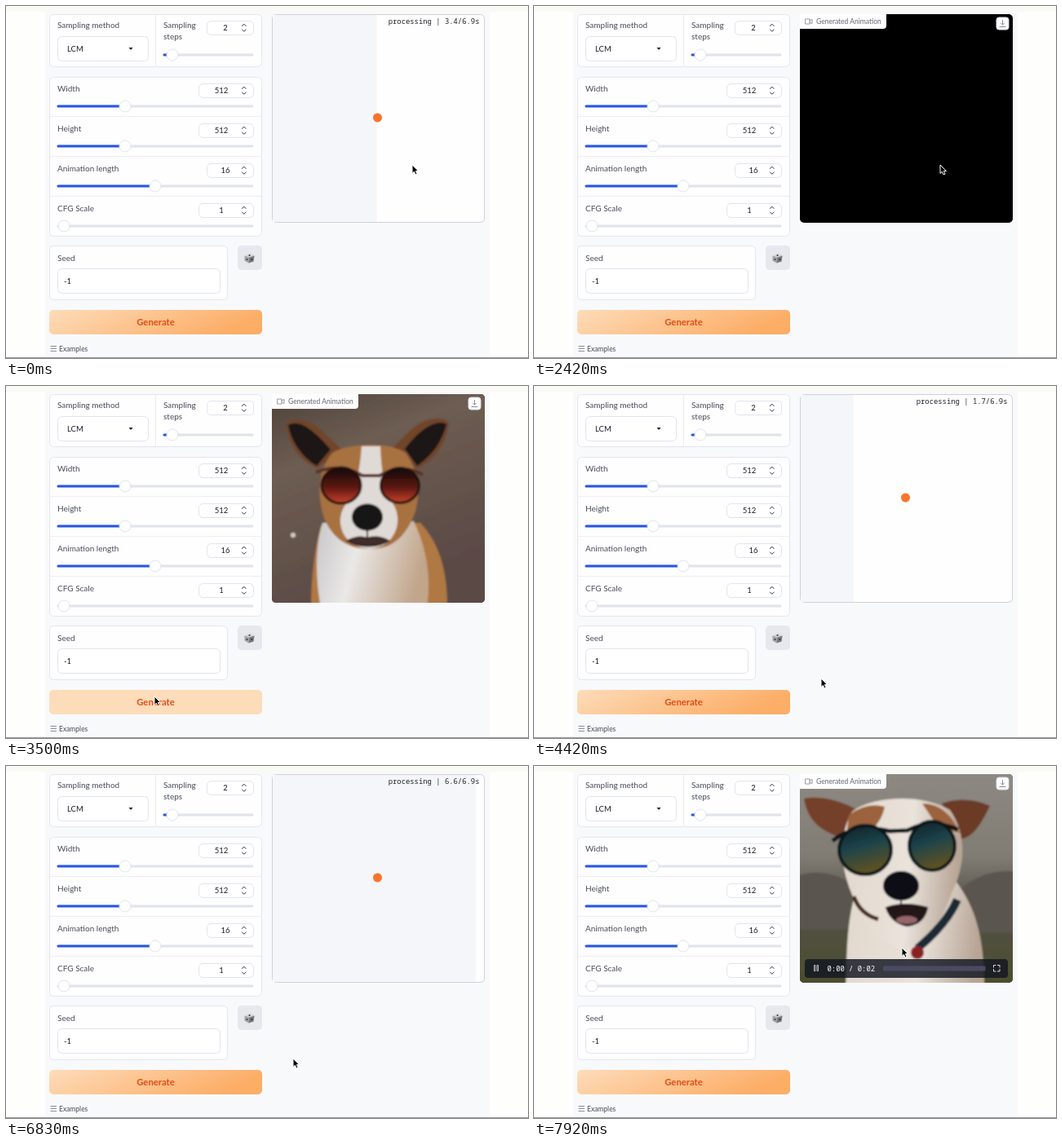
These frames come from a looping animation (640x432 px, 8 s). An HTML page:

```html
<!DOCTYPE html>
<html lang="en">
<head>
<meta charset="utf-8">
<title>Animation generator</title>
<style>
  html, body { margin: 0; height: 100%; overflow: hidden; background: #fefefd; }
  svg { display: block; width: 100%; height: 100%; }
  text { font: 10px Lato, sans-serif; fill: #494c5b; }
  .value { font-size: 9.5px; fill: #1b1d26; }
  .small { font-size: 8.5px; }
  .mono { font: 8.9px "Noto Sans Mono", monospace; fill: #20222b; }
  .panel { fill: #fefefe; stroke: #e5e6ef; }
  .field { fill: #fff; stroke: #e2e3ee; }
  .rule { stroke: #ececf3; }
  .icon { fill: none; stroke: #30323c; stroke-linecap: round; stroke-linejoin: round; }
</style>
</head>
<body>
<svg viewBox="0 0 640 432">
  <defs>
    <linearGradient id="button" x2="1" y2=".25"><stop stop-color="#fddcba"/><stop offset="1" stop-color="#fcad66"/></linearGradient>
    <linearGradient id="redLens" x2="0" y2="1"><stop offset=".1" stop-color="#1d0d0f"/><stop offset=".55" stop-color="#5c1712"/><stop offset="1" stop-color="#c8422a"/></linearGradient>
    <linearGradient id="tealLens" x2=".3" y2="1"><stop offset=".05" stop-color="#0e2229"/><stop offset=".5" stop-color="#1d434a"/><stop offset="1" stop-color="#5c5224"/></linearGradient>
    <linearGradient id="road" x2=".4" y2="1"><stop stop-color="#4d4138"/><stop offset=".35" stop-color="#6d5d52"/><stop offset="1" stop-color="#5a4945"/></linearGradient>
    <linearGradient id="meadow" x2="0" y2="1"><stop stop-color="#8e8983"/><stop offset=".4" stop-color="#817c73"/><stop offset=".62" stop-color="#54524a"/><stop offset="1" stop-color="#4b4e2c"/></linearGradient>
    <linearGradient id="chest" x2="1" y2=".2"><stop stop-color="#c9c6c8"/><stop offset=".4" stop-color="#eae8e7"/><stop offset="1" stop-color="#c2a68c"/></linearGradient>
    <linearGradient id="fur" x2="1" y2=".1"><stop offset=".1" stop-color="#e3d9cf"/><stop offset=".6" stop-color="#e9e3db"/><stop offset="1" stop-color="#b8a596"/></linearGradient>
    <clipPath id="frame"><rect x="326" y="10" width="261" height="256" rx="5"/></clipPath>
    <filter id="soft"><feGaussianBlur stdDeviation=".8"/></filter>
  </defs>

  <rect width="640" height="432" fill="#fefefd"/>
  <rect x="48" width="545" height="432" fill="#f8f9fb"/>
  <rect width="640" height="7" fill="#fafaf4"/>
  <path d="M0 431.5H640" stroke="#96969c"/>
  <g id="form"></g>

  <g id="status">
    <rect class="panel" x="326.5" y="10.5" width="260" height="255" rx="5" style="stroke:#cfd0da"/>
    <rect id="fill" x="327" y="11" height="254" fill="#f5f6f9"/>
    <circle cx="455.5" cy="137" r="5.5" fill="#f9742a"/>
    <text id="timer" class="mono" x="580.5" y="22" text-anchor="end"></text>
  </g>

  <g id="player">
    <g clip-path="url(#frame)">
      <rect x="326" y="10" width="261" height="256"/>
      <g id="dogA" filter="url(#soft)">
        <rect x="320" y="4" width="273" height="268" fill="url(#road)"/>
        <circle cx="352" cy="183" r="3" fill="#d3cbc0"/>
        <path d="M386 172C378 200 374 240 374 272H541C541 232 534 196 508 168Z" fill="#b07842"/>
        <path d="M388 168C378 200 380 240 386 272H516C522 230 514 196 500 166Z" fill="url(#chest)"/>
        <path d="M343 46C352 38 372 40 386 54L412 78L382 101C360 92 346 72 343 46Z" fill="#70452a"/>
        <path d="M543 45C534 35 510 40 494 56L474 76L504 101C526 92 540 70 543 45Z" fill="#70452a"/>
        <path d="M346 48C358 41 374 50 398 78L381 98C364 88 350 70 346 48Z" fill="#1e1517"/>
        <path d="M540 47C528 40 508 52 489 77L504 98C522 86 535 68 540 47Z" fill="#1e1517"/>
        <path d="M400 82C420 70 470 68 490 82C508 106 510 142 496 168C482 194 466 200 445 200C418 200 400 186 390 162C380 130 384 102 400 82Z" fill="#a8713f"/>
        <path d="M436 74H459C460 100 462 122 474 144C488 164 478 198 446 200C412 198 402 166 416 146C430 126 434 102 436 74Z" fill="#dfdad6"/>
        <path d="M380 106Q410 94 437 110H458Q486 94 511 109" fill="none" stroke="#5b3020" stroke-width="4"/>
        <g fill="url(#redLens)" stroke="#22110f" stroke-width="3">
          <ellipse cx="411" cy="122" rx="24" ry="22"/><ellipse cx="483" cy="122" rx="23.5" ry="21.5"/>
        </g>
        <ellipse cx="443" cy="161" rx="19" ry="16.5" fill="#141214"/>
        <path d="M443 177V187M419 190Q432 183 443 187Q457 183 469 190Q458 197 444 196Q430 197 419 190Z" fill="#3f2d2b" stroke="#2d2120" stroke-width="2"/>
      </g>
      <g id="dogB" filter="url(#soft)">
        <rect x="320" y="4" width="273" height="268" fill="url(#meadow)"/>
        <path d="M320 136Q356 122 392 146V200H320ZM593 130Q552 124 516 156V204H593Z" fill="#5a5650"/>
        <path d="M396 150C382 190 384 240 382 272H552C552 222 546 178 516 140Z" fill="url(#fur)"/>
        <path d="M331 40C350 36 376 42 396 54L376 88C354 80 336 70 331 40Z" fill="#74402a"/>
        <path d="M559 49C544 42 522 38 500 46L522 90C538 88 548 72 559 49Z" fill="#6c3b28"/>
        <path d="M390 56C416 36 478 34 510 54C530 82 530 120 512 156C498 196 480 222 452 224C422 222 402 190 390 158C374 120 374 84 390 56Z" fill="url(#fur)"/>
        <path d="M386 60Q408 44 430 50Q424 82 382 96ZM476 46Q506 46 522 82L496 76Z" fill="#9b623e"/>
        <path d="M392 160Q400 182 422 188" fill="none" stroke="#47291f" stroke-width="5"/>
        <path d="M519 164Q506 194 470 224" fill="none" stroke="#1c2b35" stroke-width="10"/>
        <circle cx="470" cy="229" r="8" fill="#8b2222"/>
        <path d="M366 92Q392 70 436 80L458 79Q486 64 520 78" fill="none" stroke="#0b1219" stroke-width="5"/>
        <g fill="url(#tealLens)" stroke="#0b1219" stroke-width="4">
          <ellipse cx="406" cy="103" rx="32" ry="30"/><ellipse cx="488" cy="98" rx="28" ry="30"/>
        </g>
        <ellipse cx="450" cy="147" rx="22" ry="18" fill="#101114"/>
        <path d="M450 163V172M432 174Q454 166 482 174Q478 194 457 196Q438 192 432 174Z" fill="#211619" stroke="#1f181a" stroke-width="2"/>
        <ellipse cx="457" cy="189" rx="13" ry="5" fill="#95656c"/>
      </g>
    </g>
    <path d="M326 10H432V24Q432 28 428 28H326Z" fill="#fefefe"/>
    <path class="icon" d="M333 16H338V22H333ZM338 18L341 16.5V21.5L338 20" style="stroke:#9698a3"/>
    <text class="small" x="346" y="22" style="fill:#646774">Generated Animation</text>
    <rect x="567" y="14" width="15" height="15" rx="3" fill="#fefefe" stroke="#dcdde6"/>
    <path class="icon" d="M574.5 17.5V23M572.5 21L574.5 23L576.5 21M571 25.5H578" style="stroke:#8a8c98"/>
    <g id="controls">
      <rect x="332" y="237" width="249" height="23" rx="4" fill="#121722" fill-opacity=".82"/>
      <path d="M343.5 244.5H345V251.5H343.5ZM347 244.5H348.5V251.5H347Z" fill="none" stroke="#ddd" stroke-width=".8"/>
      <text id="clock" class="mono" x="359.5" y="251.5" style="fill:#fff"></text>
      <rect x="428" y="245.5" width="125.5" height="6" rx="1" fill="#4a4b62"/>
      <rect id="played" x="428" y="245.5" height="6" rx="1" fill="#f7f6f4"/>
      <path class="icon" d="M563.5 247V244.5H566M568.5 244.5H571V247M571 249.5V252H568.5M566 252H563.5V249.5" style="stroke:#ddd"/>
    </g>
  </g>

  <g id="cursor">
    <path id="arrow" d="M0 0V10.5L2.4 8.3L4.1 12L6 11.2L4.4 7.6H7.5Z" fill="#000" stroke="#fff"/>
    <g id="beam" fill="none">
      <path d="M-3-6Q0-6 0-4Q0-6 3-6M0-4V4M-3 6Q0 6 0 4Q0 6 3 6" stroke="#fff" stroke-width="2.6"/>
      <path d="M-3-6Q0-6 0-4Q0-6 3-6M0-4V4M-3 6Q0 6 0 4Q0 6 3 6" stroke="#333"/>
    </g>
  </g>
</svg>
<script>
const $ = id => document.getElementById(id);
const box = (cls, x, y, w, h, r = 5) =>
  `<rect class="${cls}" x="${x + .5}" y="${y + .5}" width="${w - 1}" height="${h - 1}" rx="${r}"/>`;
const label = (text, x, y, attrs = '') => `<text x="${x}" y="${y}" ${attrs}>${text}</text>`;

const numberBox = (value, x, y) => box('field', x, y, 304 - x, 18) +
  label(value, x + (304 - x) / 2 - 6, y + 12, 'class="value" text-anchor="middle"') +
  `<path class="icon" d="M289.5 ${y + 6.5}l2.3-2.3l2.3 2.3M289.5 ${y + 11}l2.3 2.3l2.3-2.3"/>`;

const slider = (x, y, knob) => `<g stroke-width="3" stroke-linecap="round">
  <path d="M${x + 1} ${y}H302" stroke="#e1e3eb"/>
  ${knob - x > 10 ? `<path d="M${x + 1} ${y}H${knob - 6}" stroke="#2457e6"/>` : ''}</g>
  <circle class="field" cx="${knob}" cy="${y}" r="7"/>`;

const rows = [['Width', 512, 236, 146], ['Height', 512, 236, 146],
  ['Animation length', 16, 246, 183], ['CFG Scale', 1, 236, 71]];

$('form').innerHTML =
  box('panel', 53, 10, 261, 65) + '<path class="rule" d="M183.5 11V74"/>' +
  label('Sampling method', 63, 27) + box('field', 63, 37, 112, 31) +
  label('LCM', 75, 55.5, 'class="value"') + '<path d="M150.5 51H155.5L153 54Z" fill="#20222b"/>' +
  label('Sampling', 193, 27) + label('steps', 193, 41) +
  numberBox(2, 246, 18) + slider(193, 60, 204) +
  box('panel', 53, 87, 261, 196) +
  rows.map(([name, value, x, knob], i) => {
    const y = 87 + i * 49;
    return (i ? `<path class="rule" d="M54 ${y - .5}H313"/>` : '') +
      label(name, 63, y + 18) + numberBox(value, x, y + 8) + slider(63, y + 36, knob);
  }).join('') +
  box('panel', 53, 294, 219, 67) + label('Seed', 63, 312.5) +
  box('field', 63, 322, 200, 31) + label('-1', 71, 341, 'class="value"') +
  '<rect x="284" y="294" width="30" height="30" rx="5" fill="#e7e8ed"/>' +
  `<g transform="translate(298.5 309.5)"><path d="M-6-3L1-6L6-3L5 4L-1 6L-6 3Z" fill="#d6d5d6"/>
   <path d="M-6-3L0-1L-1 6L-6 3Z" fill="#a3a2a5"/><path d="M0-1L6-3L5 4L-1 6Z" fill="#77767a"/>
   <g fill="#333338"><circle cx="0" cy="-3.5" r="1"/><circle cx="-3" cy="1.5" r="1"/><circle cx="2.8" cy="1.5" r="1"/></g></g>` +
  '<rect id="generate" x="53" y="373" width="261" height="30" rx="5" fill="url(#button)"/>' +
  label('Generate', 183.5, 392, 'text-anchor="middle" style="font-size:11.3px;font-weight:700;fill:#e24c16"') +
  '<path d="M54.5 417.5H62M54.5 420.5H62M54.5 423.5H62" stroke="#8b8d99"/>' +
  label('Examples', 65, 423.5, 'class="small"');

const LOOP = 8000, STEP = 1000 / 12, ETA = 6.9, VIDEO = 1000;
const PROGRESS_STEPS = 8.5; // the bar only moves on the player's coarse time updates
const runs = [
  { start: 0, from: 3.4, rate: 1.89, done: 1990, play: 2600, dog: 'dogA' },
  { start: 3570, from: 0, rate: 2.03, done: 7160, play: 7830, dog: 'dogB' },
];
// time, x, y of the pointer
const path = [[0, 498, 195], [2850, 498, 195], [3500, 182, 381], [3660, 182, 381],
  [4160, 352, 359], [7330, 352, 359], [7880, 451, 223], [LOOP, 451, 223]];

function pointerAt(t) {
  const i = path.findIndex(p => p[0] > t), [t0, x0, y0] = path[i - 1], [t1, x1, y1] = path[i];
  const k = (t - t0) / (t1 - t0), e = k * k * (3 - 2 * k);
  return [x0 + (x1 - x0) * e, y0 + (y1 - y0) * e];
}
const show = (id, on) => $(id).style.display = on ? '' : 'none';

function draw(now) {
  const t = Math.floor((now % LOOP + 4) / STEP) % 96 * STEP;
  const run = runs[t < runs[1].start ? 0 : 1];
  const [x, y] = pointerAt(t);
  const done = t >= run.done, playing = t >= run.play;
  const controls = playing && x > 326 && x < 587 && y < 266;
  const beam = controls && y > 242 && y < 255 && x > 360 && x < 420;

  show('status', !done);
  show('player', done);
  for (const { dog } of runs) show(dog, playing && dog === run.dog);
  show('controls', controls);
  show('arrow', !beam);
  show('beam', beam);

  const elapsed = run.from + (t - run.start) / 1000 * run.rate;
  $('timer').textContent = `processing | ${elapsed.toFixed(1)}/${ETA}s`;
  $('fill').setAttribute('width', 259 * Math.min(1, elapsed / ETA));

  const progress = Math.min(1, Math.max(0, (t - run.play) / VIDEO));
  const played = Math.floor(progress * PROGRESS_STEPS) / PROGRESS_STEPS;
  $('clock').textContent = `0:0${Math.floor(played * 2)} / 0:02`;
  $('played').setAttribute('width', 125.5 * played);

  const hover = x > 53 && x < 314 && y > 373 && y < 403;
  $('generate').setAttribute('fill', hover ? '#fddcba' : 'url(#button)');
  $('cursor').setAttribute('transform', `translate(${x} ${y})`);
}

const begin = performance.now();
(function tick() {
  draw(performance.now() - begin);
  requestAnimationFrame(tick);
})();
</script>
</body>
</html>
```
